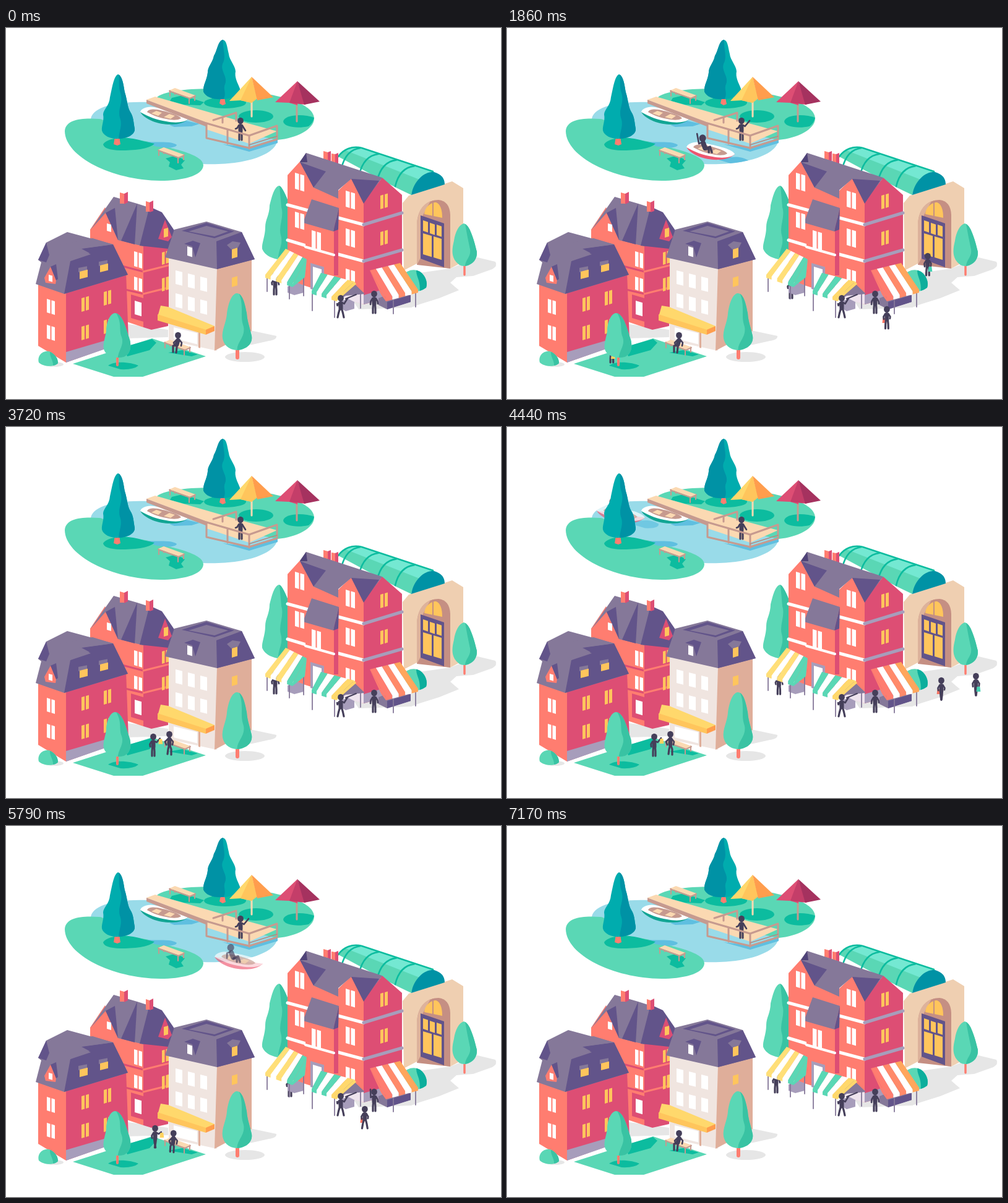
An HTML page with a canvas that plays this animation: 800x600 px, repeating every 7200 ms.

```html
<!DOCTYPE html>
<html lang="en">
<head>
<meta charset="utf-8">
<title>Little town</title>
<style>
html,body{margin:0;width:100%;height:100%;overflow:hidden;background:#fff}
canvas{display:block;width:800px;height:600px}
</style>
</head>
<body>
<canvas id="c" width="800" height="600"></canvas>
<script>
const g = document.getElementById('c').getContext('2d');
const LOOP = 7200, HALF = 3600;
const red = '#ff7d70', rose = '#dd4e74', mauve = '#857899', plum = '#62548a', lilac = '#a79dbb',
  mint = '#5ad7b5', jade = '#0cbc9f', teal = '#00acae', deep = '#0092a5', sun = '#ffc55c',
  wood = '#fbd9b2', bark = '#c69a8f', grey = '#e6e6e6', ink = '#453f5a', white = '#fff', blue = '#5fbfe0';

// helpers
const cache = new Map();
function path(s) {
  if (!cache.has(s)) cache.set(s, new Path2D('M' + s));
  return cache.get(s);
}
function fill(c, s) { g.fillStyle = c; g.fill(path(s + 'Z')); }
function line(c, w, s) { g.strokeStyle = c; g.lineWidth = w; g.stroke(path(s)); }
function poly(c, pts) {
  g.fillStyle = c;
  g.beginPath();
  pts.forEach(p => g.lineTo(p[0], p[1]));
  g.fill();
}
function bend(c, w, pts) {
  g.strokeStyle = c; g.lineWidth = w;
  g.beginPath();
  pts.forEach(p => g.lineTo(p[0], p[1]));
  g.stroke();
}
function oval(c, x, y, rx, ry) {
  g.fillStyle = c;
  g.beginPath();
  g.ellipse(x, y, rx, ry, 0, 0, 7);
  g.fill();
}
function slab(c, x, y, w, h, k) { poly(c, [[x, y], [x + w, y + w * k], [x + w, y + w * k + h], [x, y + h]]); }
function panes(c, x, y, w, h, k) {
  const p = (w - 2) / 2;
  slab(c, x, y, p, h, k);
  slab(c, x + p + 2, y + (p + 2) * k, p, h, k);
}
const ramp = (t, a, b) => Math.max(0, Math.min(1, (t - a) / (b - a)));
const ease = (t, a, b) => { const u = ramp(t, a, b); return u * u * (3 - 2 * u); };
const mix = (a, b, u) => a.map((v, i) => v + (b[i] - v) * u);
function along(t, keys) {
  let i = 1;
  while (i < keys.length - 1 && t > keys[i][0]) i++;
  const a = keys[i - 1], b = keys[i];
  return mix(a, b, ramp(t, a[0], b[0])).slice(1);
}
function faded(alpha, draw) {
  if (alpha <= 0) return;
  g.save();
  g.globalAlpha = alpha;
  draw();
  g.restore();
}
function plant(base, shade, shape, side) {
  g.save();
  g.clip(path(shape + 'Z'));
  g.fillStyle = base;
  g.fillRect(0, 0, 800, 600);
  fill(shade, side);
  g.restore();
}
function awning(a, b, c, d, cols) {
  const n = cols.length;
  cols.forEach((col, i) => {
    const p = mix(a, b, i / n), q = mix(a, b, (i + 1) / n), r = mix(d, c, (i + 1) / n), s = mix(d, c, i / n);
    poly(col, [p, q, r, [r[0], r[1] + 5], [s[0], s[1] + 5], s]);
  });
}
function bench(x, y) {
  g.save();
  g.translate(x, y);
  line(bark, 2, '1 4V13M9 7V10M32 15V25M41 12V20');
  fill(wood, '0 4 9 0 42 12 33 16');
  line(bark, 2, '0 5 33 17 42 13');
  g.restore();
}

// people: x,y is the head, hands are offsets from it
function man(x, y, step, h1, h2) {
  bend(ink, 3.2, [[x - 1.5, y + 17], [x - 2 - step * .5, y + 24], [x - 2 - step, y + 31]]);
  bend(ink, 3.2, [[x + 1.5, y + 17], [x + 2 + step * .5, y + 24], [x + 2 + step, y + 31]]);
  bend(ink, 7, [[x, y + 8.5], [x, y + 16]]);
  for (const [hx, hy] of [h1, h2]) {
    const s = Math.sign(hx);
    bend(ink, 2.6, [[x + s * 2.5, y + 7], [x + s * 5.5, y + (hy > 6 ? 12 : 9)], [x + hx, y + hy]]);
  }
  oval(ink, x, y, 4.9, 5.3);
}
function bag(x, y, c) { fillBag(c, x, y, 3.4); }
function fillBag(c, x, y, r) { poly(c, [[x - r + 1, y], [x + r - 1, y], [x + r, y + 8], [x - r, y + 8]]); }
const stride = t => 4 * Math.sin(t / 85);

function boat(x, y, hull) {
  g.save();
  g.translate(x, y);
  fill(hull, '-78 -11C-70 2-46 10-26 9C-17 9-6 6 0 0Z');
  fill(white, '-78 -11C-77 -17-66 -21-56 -19C-34 -15-4 -9 0 0C-6 6-22 7-36 4C-51 2-66 -4-78 -11');
  fill(bark, '-67 -11C-65 -16-57 -16-50 -15C-36 -12-16 -7-12 -1C-18 3-28 2-36 0C-48 -2-58 -6-67 -11');
  fill(wood, '-60 -9-52 -13-43 -10-49 -5M-40 -3-31 -8-22 -5-29 0');
  g.restore();
}
function rower(x, y, up) {
  bend(ink, 3.4, [[x - 47, y - 9], [x - 40, y - 12], [x - 37, y - 3]]);
  bend(ink, 3.2, [[x - 48, y - 8], [x - 42, y - 9], [x - 42, y - 3]]);
  bend(ink, 8, [[x - 51, y - 18], [x - 48, y - 10]]);
  const hand = mix([-58, -9], [-61, -33], up);
  bend(ink, 2.6, [[x - 53, y - 19], [x - 58, y - 17], [x + hand[0], y + hand[1]]]);
  oval(ink, x - 52, y - 26, 5.6, 5.8);
}

function lake(c) {
  fill('#99dbe9', '137 148C138 130 172 118 228 120L335 160 439 178C440 205 385 223 318 220L200 205');
  fill(mint, '243 113C256 99 320 96 368 100C440 106 498 121 498 147C497 164 470 178 439 181L335 160');
  oval(jade, 354, 121, 34, 9);
  oval(jade, 404, 143, 28, 10);
  fill(jade, '448 151C450 140 480 138 498 145Q496 154 489 159C470 163 449 160 448 151');
  fill(jade, '268 113 285 109 320 120 314 125 288 124 265 118');
  fill(blue, '264 157 291 150 313 155 300 159 272 160');
  boat(295, 147, '#12a594');
  bench(264, 97);
  fill(red, '347 113 353 113 355 123 350 125 345 122');
  plant(teal, deep,
    '350 19C342 22 342 35 336 45C334 56 326 62 326 72C325 84 318 92 319 103C323 112 336 116 350 115C366 115 379 108 378 98C374 88 369 80 371 70C370 60 361 52 360 42C357 30 357 20 350 19',
    '310 10 351 19C349 32 357 45 350 58C346 70 359 78 354 91C350 99 358 106 350 118L310 120');

  // pier
  fill(blue, '350 188 393 200 439 186 439 178 393 193');
  fill(wood, '227 116 241 111 376 150 438 167 393 187 324 164 324 153');
  fill(bark, '227 116 325 153 325 160 227 122');
  line(bark, 3, '335 149 372 137V150');
  line(bark, 3, '350 145V153');
  man(379, 150, 0, [-8, 13], mix([8, 16], [13, 0], ease(c, 1480, 1720) - ease(c, 2250, 2600)));
  line(bark, 3, '324 154 393 174 438 158V180L393 194 324 178ZM358 164V187M393 174V195');
  line('#b58980', 1.4, '393 189 438 175');

  // parasols
  line(wood, 3, '397 116V143');
  fill('#ffd86c', '397 79 361 118 379 117 397 121');
  fill(sun, '397 79 379 117 397 121 406 114');
  fill('#ff9d4d', '397 79 406 117 432 112');
  line(bark, 3, '470 121V151');
  fill(rose, '471 86 435 120 458 121 471 125');
  fill('#c43e69', '471 86 458 121 484 124');
  fill('#a5325f', '471 86 482 124 507 119');
}

function rowing(c) {
  const x = 368 + (c - 1860) * .1424, y = 204 + (x - 368) * .396;
  faded(Math.min(ramp(c, 600, 950), 1 - ramp(c, 2080, 2400)), () => {
    if (x < 400) {
      g.save();
      g.clip(path('137 148C138 130 172 118 228 120L335 160 439 178C440 205 385 223 318 220L200 205Z'));
      g.translate(x, y);
      fill(blue, '-30 8C-10 6 5 0 22 10Q24 18 0 17');
      g.restore();
    }
    boat(x, y, '#ee5670');
    rower(x, y, ease(c, 1500, 1750) - ease(c, 1950, 2150));
  });
}

function shore() {
  fill(mint, '95 167C96 148 122 145 150 147C166 148 160 164 182 172C202 183 225 180 240 187C262 194 319 203 319 222C318 240 282 247 250 247C170 246 96 208 95 167');
  fill(blue, '205 180C228 189 264 180 276 189C274 196 248 194 238 190');
  fill(jade, '157 188C165 176 198 175 222 183L240 187C232 196 205 198 185 198Q158 197 157 188');
  fill(jade, '258 211 275 206 289 214 283 221 287 227 275 230 263 224 265 217');
  bench(246, 193);
  fill(red, '176 176 183 176 185 188 180 190 174 188');
  plant(teal, deep,
    '181 75C174 77 171 100 168 112C167 126 157 132 157 140C159 150 154 158 155 166C158 176 172 180 182 179C196 179 209 172 208 163C206 152 206 143 201 136C196 128 196 116 192 104C190 92 188 77 181 75',
    '182 75H230V190H183C179 170 190 160 184 145C180 130 190 122 185 105C181 94 184 85 182 75');
}

function hall(c) {
  fill(grey, '640 400 718 389 762 371 791 378Q795 385 786 390L755 401 728 403 718 412 732 424 700 437 668 447 655 452 570 455 560 440');
  fill('#efcfb1', '641 283 651 271 721 248 739 259V378L718 389 664 381 643 392');
  fill('#c58f83', '664 383V318C665 290 682 278 699 278Q717 280 718 302V389');
  fill('#ddb29b', '664 383V318C665 294 676 284 686 280L672 306 670 372');
  fill(sun, '676 301C677 288 688 282 695 282Q705 286 705 307');
  line('#c58f83', 2, '690 280V305');
  fill(plum, '670 303 708 316V387L670 373');
  slab(sun, 674, 311, 8, 17, .34);
  slab(sun, 685, 315, 8, 17, .34);
  slab(sun, 696, 318, 8, 17, .34);
  slab(sun, 674, 332, 14, 34, .3);
  slab(sun, 691, 337, 13, 34, .3);

  // shopper stepping through the gate
  const [x, y] = along(c, [[480, 788, 416], [840, 758, 403], [1080, 738, 394], [1860, 680, 369], [2250, 651, 357]]);
  g.save();
  g.beginPath(); g.rect(663, 0, 137, 600); g.clip();
  if (c < 1500) { trunkTree(); }
  faded(Math.min(ramp(c, 480, 720), 1 - ramp(c, 2180, 2300)), () => {
    man(x, y, stride(c), [-5, 17], [5, 16]);
    bag(x + 4, y + 17, '#45d0b2');
  });
  if (c >= 1500) { trunkTree(); }
  g.restore();

  // glass vault
  fill(mint, '537 208C545 196 560 190 575 194L690 232C675 236 660 250 655 270L630 258');
  fill('#74e8d2', '549 198Q560 190 575 194L690 232Q675 235 668 245');
  for (let i = 0; i < 4; i++) {
    const a = 573 + i * 29, b = 194 + i * 9.7;
    g.strokeStyle = jade; g.lineWidth = 2.6;
    g.beginPath(); g.moveTo(a, b); g.quadraticCurveTo(a - 24, b + 3, a - 31, b + 33); g.stroke();
  }
  line(jade, 2.6, '537 208C545 196 560 190 575 194L690 232');
  fill(deep, '655 270C659 246 678 231 692 233Q709 238 709 253');
}
function trunkTree() {
  line(red, 3.5, '741 374V399');
  plant(mint, '#39c3a3', '740 316C732 318 726 330 724 344C721 356 720 366 725 375Q732 386 742 385C755 383 762 373 761 362C758 350 756 342 752 332Q747 318 740 316',
    '742 316H770V390H742C740 375 752 372 750 358C748 348 744 330 742 316');
}

function market(c) {
  plant(mint, '#39c3a3', '441 255C433 258 430 272 426 287C426 302 419 310 419 322C419 337 413 348 414 357C418 368 432 376 456 375V280Q446 255 441 255',
    '442 255H480V380H440C438 360 449 352 444 335C440 320 450 305 445 290');
  fill(red, '455 238 475 216 497 240 537 263 558 243 578 270V447L455 408');
  fill(rose, '578 280 608 242 640 270V430L578 447');
  fill(lilac, '578 432 640 414V430L578 447');
  fill('#efe4ee', '517 410 578 428V447L517 430');

  // chimneys and roof
  fill(red, '513 199 520 201V216H513M526 203 532 204V220H526');
  fill(rose, '520 201 525 199V218H520M532 204 537 202V220H532');
  fill(mauve, '485 202 608 242 578 282 558 244 537 262V276L497 258 475 216');
  fill(plum, '475 217 517 232 497 258M558 244 603 247 578 284');
  fill('#4f4378', '475 217 485 202 487 217');

  // floors
  line(white, 5, '455 286 488 295M537 307 578 318M455 343 488 353M537 366 578 377');
  line(lilac, 5, '578 318 640 299M578 377 640 359');

  // bay
  fill(rose, '530 321 537 300V400H530');
  fill(red, '484 318 530 329V424L484 412');
  fill(mauve, '494 277 538 291 529 329 480 315');
  fill(plum, '538 291 529 329 537 326');
  line(white, 4, '484 354 530 367');
  panes(white, 467, 234, 15, 26, .3);
  panes(white, 467, 297, 15, 25, .3);
  panes(white, 549, 263, 15, 26, .3);
  panes(white, 549, 324, 15, 27, .3);
  panes(white, 549, 389, 15, 22, .3);
  panes(white, 494, 327, 15, 28, .3);
  panes(sun, 605, 271, 12, 22, -.3);
  panes(sun, 605, 330, 12, 22, -.3);
  slab(lilac, 492, 380, 22, 42, .3);
  slab(white, 496, 386, 14, 34, .3);

  // first stall
  const sway = ease(c, 480, 1800) - ease(c, 2200, 3400);
  man(435 + 24 * sway, 400 + 6 * sway, 1.5 * Math.sin(c / 90) * (sway > 0 && sway < 1), [-5, 15], [6, 15]);
  fill(lilac, '455 418 471 412 481 416 481 428 466 432 455 428');
  line(mauve, 1.8, '422 400V426M458 413V438M481 402V433');
  awning([452, 357], [486, 374], [463, 414], [419, 399], ['#ffdf78', white, '#ffdf78', white, mint]);
  fill(mint, '486 374 483 403 463 419 463 414');

  // second stall
  fill(mauve, '557 408 580 430 549 433 537 440');
  fill(lilac, '537 443 553 438 563 443V454L549 458 537 451');
  line(mauve, 1.8, '495 428V457M531 440V468M573 425V453');
  awning([509, 396], [563, 410], [534, 437], [494, 425], [mint, white, mint, white, '#ffd86c']);
  fill('#ffd86c', '563 410 566 414 534 442 534 437');
  man(541, 437, 3, [-6, 9], [11, 0]);
  line(ink, 2, '549 438 566 431');

  // third stall
  plant(mint, '#0cae9c', '640 402C648 390 661 389 669 394C678 400 682 412 679 420Q668 428 655 426',
    '664 388C660 402 672 406 668 430H690V388');
  fill(mauve, '602 437 620 430 654 432V443L616 455 602 448');
  fill(plum, '616 443 654 432V443L616 455');
  line(mauve, 1.8, '626 440V462M662 428V451');
  awning([588, 392], [637, 380], [666, 423], [614, 437], [red, white, '#ff8a6a', white, '#ffa65c']);
  fill(red, '588 392 614 437 614 442 606 431');
  const up = ease(c, 1950, 2170) - ease(c, 3100, 3450);
  man(595, 430, 0, mix([-6, 17], [-6, -4], up), [6, 16]);

  const [x, y] = along(c, [[580, 713, 393], [840, 702, 410], [1080, 690, 427], [1420, 658, 447], [1860, 614, 455], [2190, 580, 458], [2700, 505, 441]]);
  faded(Math.min(ramp(c, 580, 820), 1 - ramp(c, 2900, 3150)), () => {
    bag(x + (c > 2650 ? 4 : -4), y + 14, '#f77565');
    man(x, y, c < 2700 ? stride(c) : 0, [-5, 16], [5, 15]);
  });
}

function leftHouse() {
  fill(red, '52 405 97 424V541L52 514');
  fill(rose, '97 424 194 396 198 505 97 541');
  fill(lilac, '97 524 172 502V515L97 541');
  fill(mauve, '65 347 99 330 173 350 197 399 94 430 48 414 57 379 52 375');
  fill(plum, '104 377 135 364 122 357 173 350 197 399 94 430');
  fill(mauve, '104 377 137 366 118 357 173 350 140 340 88 350');
  fill(plum, '65 347 52 375 65 379 70 367');
  fill(red, '62 404 72 386 81 408 80 414 64 412');
  fill(plum, '72 386 81 382 84 406 81 408');
  slab(white, 69, 399, 6, 10, .3);
  slab(mauve, 117, 388, 14, 7, -.2);
  slab(sun, 119, 394, 13, 12, -.25);
  slab(mauve, 150, 378, 14, 7, -.2);
  slab(sun, 152, 384, 13, 11, -.25);
  for (const y of [438, 480]) panes(white, 66, y, 13, 22, .3);
  for (const y of [437, 483]) {
    panes(sun, 122, y, 12, 22, -.3);
    panes(sun, 158, y - 10, 12, 22, -.3);
  }
}

function tower() {
  fill(grey, '190 478 262 488 262 500 196 502');
  fill(rose, '222 348 262 340 268 350 262 482 235 488 222 484');
  fill(red, '136 326 160 290 182 342 222 350V484L180 470V400L136 380');
  line(rose, 3, '180 383 222 394M180 420 222 430');
  line(red, 3, '222 394 262 384M222 430 262 420');
  fill(mauve, '136 327 174 273 212 284 240 293 222 353 181 343 161 299');
  fill(plum, '176 291 161 299 181 343M212 284 186 344 208 350M232 289 252 298 278 336 262 357 216 352');
  fill(rose, '246 341 257 310 268 338 262 345');
  slab(sun, 255, 325, 7, 14, -.3);
  fill(red, '184 266 191 268V284H184M226 280 232 282V297H226');
  fill(rose, '191 268 197 265V282L191 285M232 282 238 279V296L232 298');
  slab(white, 163, 316, 7, 12, .3);
  panes(white, 207, 361, 13, 24, .3);
  panes(white, 207, 402, 13, 21, .3);
  slab(rose, 202, 431, 22, 38, .3);
  slab(white, 208, 441, 11, 22, .3);
  panes(sun, 252, 405, 11, 21, -.3);
  panes(sun, 252, 363, 11, 20, -.3);
}

function shop() {
  fill(grey, '390 488 437 498Q438 504 425 506L398 512 370 515');
  fill('#f0e5e0', '263 372 341 388V522L263 505');
  fill('#dfae9a', '341 388 397 374V490L337 522');
  fill(mauve, '257 371 272 326 324 313 381 330 402 374 341 390');
  fill(plum, '340 345 381 330 402 374 341 390');
  fill(plum, '284 328 324 315 369 329 337 340');
  fill(mauve, '295 329 324 320 359 329 337 337');
  fill(plum, '288 349 302 344 314 348 306 371 301 353');
  slab(white, 293, 353, 8, 15, .3);
  fill(mauve, '357 351 366 345 379 347 375 355 364 358');
  slab(sun, 365, 358, 9, 15, -.3);
  for (let i = 0; i < 3; i++) {
    slab(white, 274 + i * 20, 392 + i * 5, 11, 22, .25);
    slab(white, 274 + i * 20, 429 + i * 5, 11, 22, .25);
  }
  slab(sun, 365, 404, 9, 15, -.3);
  slab(white, 271, 484, 38, 18, .25);
  slab('#dfae9a', 311, 492, 3, 25, .25);
  fill('#ffd86c', '250 449 262 451 337 482 323 490 245 467');
  fill(sun, '245 463 323 488V496L245 473');
  fill('#ff9d4d', '337 482 337 490 323 496 323 488');
}

function town(t) {
  oval(grey, 78, 544, 15, 4);
  oval(grey, 386, 532, 32, 8);
  tower();
  leftHouse();
  fill(mint, '108 543 236 502 323 531 221 564 174 564');
  fill(jade, '190 516 236 503 243 509 232 521 196 531');
  fill(jade, '165 546C175 537 205 541 214 546Q206 553 185 552');
  fill(jade, '262 525 285 521 310 528 300 531');

  const [x, y] = along(t, [[550, 66, 524], [1080, 107, 518], [2720, 238, 501], [5300, 238, 501], [5790, 241, 489], [6300, 251, 476]]);
  const moving = t < 2720 || t > 5300;
  const lift = ease(t, 3300, 3800) * (1 - .4 * ease(t, 4700, 5200));
  faded(Math.min(ramp(t, 550, 800), 1 - ramp(t, 6000, 6280)), () => {
    const hand = t < 2500 ? [2, 16] : mix([8, 12], [11, 2], lift);
    man(x, y, moving ? stride(t) * .8 : 0, [-5, 16], hand);
    bag(x + hand[0] + (t < 2500 ? 0 : 1), y + hand[1] + 1, '#ffd35f');
  });

  shop();
  bench(256, 504);
  const up = ease(t, 2300, 2700) - ease(t, 5450, 6150);
  const head = mix([278, 497], [264, 497], up), hip = mix([276, 512], [264, 513], up);
  bend(ink, 3.2, [hip, mix([270, 514], [262, 521], up), mix([270, 524], [261, 529], up)]);
  bend(ink, 3.2, [hip, mix([276, 516], [267, 521], up), mix([275, 525], [267, 530], up)]);
  bend(ink, 7, [[head[0], head[1] + 8], hip]);
  bend(ink, 2.6, [[head[0] - 2, head[1] + 7], [head[0] - 7, head[1] + 12], [head[0] - 5, head[1] + 17]]);
  bend(ink, 2.6, [[head[0] + 2, head[1] + 7], [head[0] + 6, head[1] + 12], [head[0] + 5, head[1] + 17]]);
  oval(ink, head[0], head[1], 4.9, 5.3);

  // garden
  plant(mint, '#39c3a3', '53 541C50 531 58 521 70 523Q84 530 84 542C78 549 60 548 53 541', '72 520C68 532 78 536 76 550H90V520');
  line(red, 4, '180 530V545');
  plant(mint, '#39c3a3', '176 461C168 462 162 476 162 490C160 503 155 514 159 522C164 532 180 535 190 532C201 528 203 515 200 504C196 492 194 484 189 473Q183 461 176 461',
    '178 461H210V540H181C178 524 192 515 187 500C182 488 188 478 178 461');
  line(red, 6, '374 516V533');
  plant(mint, '#39c3a3', '373 429C364 430 359 447 357 462C356 477 348 489 350 502C353 516 364 521 375 521C391 519 399 509 397 498C394 484 390 475 389 461C386 445 382 429 373 429',
    '376 428H405V525H374C370 508 390 500 383 480C378 465 385 448 376 428');
}

function frame(now) {
  const t = now % LOOP, c = t % HALF;
  g.fillStyle = white;
  g.fillRect(0, 0, 800, 600);
  g.lineCap = 'round';
  g.lineJoin = 'round';
  lake(c);
  rowing(c);
  shore();
  hall(c);
  market(c);
  town(t);
}

const start = performance.now();
function tick() {
  frame(performance.now() - start);
  requestAnimationFrame(tick);
}
tick();
</script>
</body>
</html>
```
